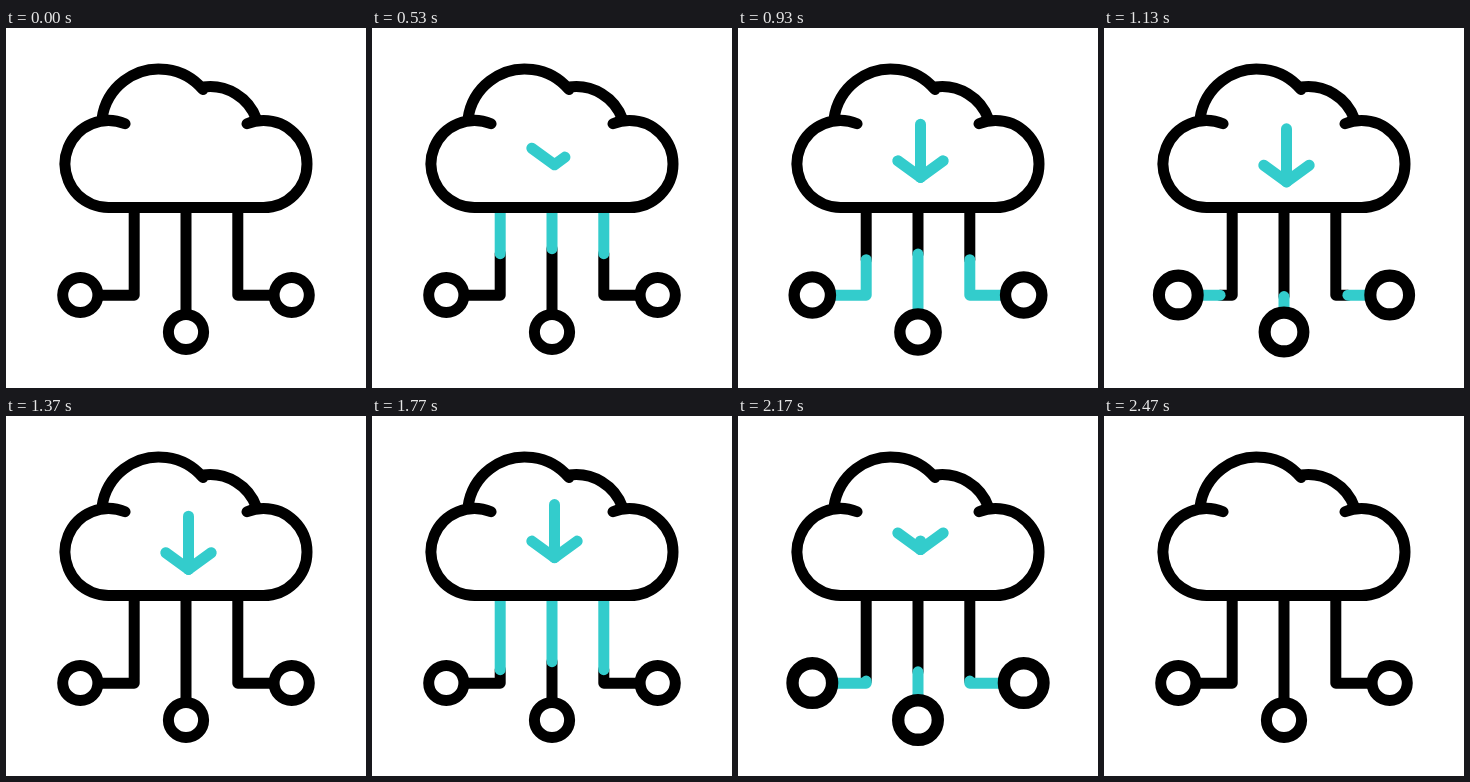
These frames come from a looping animation (360 px wide and 360 px high, 2500 ms). An HTML page with a canvas:

```html
<!DOCTYPE html>
<html lang="en">
<head>
<meta charset="utf-8">
<title>Cloud download</title>
<style>
  html, body { margin: 0; width: 100%; height: 100%; overflow: hidden; background: #fff; }
  canvas { display: block; }
</style>
</head>
<body>
<canvas id="stage" width="360" height="360"></canvas>
<script>
const ctx = document.getElementById('stage').getContext('2d');
const LOOP = 2500, START = 300, CYCLE = 1100;
const BLACK = '#000', TEAL = '#33cccc';

const wires = [
  [[128.2, 179.5], [128.2, 267.2], [92, 267.2]],
  [[180, 179.5], [180, 290]],
  [[231.8, 179.5], [231.8, 267.2], [268, 267.2]]
];
const nodes = [[74.3, 267], [180, 304], [285.7, 267]];
const chevron = [[159.8, 117], [182.5, 133.5], [205.2, 117]];
const stem = [[182.5, 133.5], [182.5, 80.5]];

const cloud = new Path2D();
cloud.arc(102.5, 136, 43.5, -1.18, Math.PI / 2, true);
cloud.arc(257.5, 136, 43.5, Math.PI / 2, -1.96, true);
cloud.moveTo(96, 91);
cloud.arc(153, 98.5, 57.5, Math.PI + 0.13, -0.7);
cloud.arc(204, 108, 49.5, -1.71, -0.34);

const ramp = (t, from, to) => Math.min(1, Math.max(0, (t - from) / (to - from)));
const smooth = x => x * x * (3 - 2 * x);

const length = pts => pts.slice(1).reduce(
  (sum, p, i) => sum + Math.hypot(p[0] - pts[i][0], p[1] - pts[i][1]), 0);

// Strokes the part of a polyline between two fractions of its length.
function trace(pts, color, from, to) {
  if (to - from < 0.001) return;
  const len = length(pts);
  ctx.strokeStyle = color;
  ctx.beginPath();
  pts.forEach(p => ctx.lineTo(...p));
  ctx.setLineDash([(to - from) * len + 0.01, 1000]);
  ctx.lineDashOffset = -from * len;
  ctx.stroke();
  ctx.setLineDash([]);
}

function drawArrow(t) {
  const a = length(chevron), b = length(stem);
  const shown = (a + b) * (ramp(t, 300, 915) - ramp(t, 1967, 2467));
  const dip = smooth(ramp(t, 300, 1233)) - smooth(ramp(t, 1233, 2167));
  ctx.save();
  ctx.translate(0, 21 * dip);
  trace(chevron, TEAL, 0, Math.min(1, shown / a));
  trace(stem, TEAL, 0, Math.max(0, (shown - a) / b));
  ctx.restore();
}

function drawNode([x, y], scale) {
  ctx.save();
  ctx.translate(x, y);
  ctx.scale(scale, scale);
  ctx.beginPath();
  ctx.arc(0, 0, 17.6, 0, 2 * Math.PI);
  ctx.fillStyle = '#fff';
  ctx.fill();
  ctx.strokeStyle = BLACK;
  ctx.stroke();
  ctx.restore();
}

function draw(t) {
  const phase = t < START ? 0 : (t - START) % CYCLE;
  const head = ramp(phase, 0, 620), tail = ramp(phase, 412, 932);
  const pulse = (1 - Math.cos(2 * Math.PI * ramp(phase, 560, 980))) / 2;

  ctx.clearRect(0, 0, 360, 360);
  ctx.lineCap = ctx.lineJoin = 'round';
  ctx.lineWidth = 11;
  for (const wire of wires) {
    trace(wire, BLACK, 0, tail);
    trace(wire, BLACK, head, 1);
    trace(wire, TEAL, tail, head);
  }
  ctx.strokeStyle = BLACK;
  ctx.stroke(cloud);
  nodes.forEach(node => drawNode(node, 1 + 0.125 * pulse));
  drawArrow(t);
}

const begin = performance.now();
function tick() {
  draw((performance.now() - begin) % LOOP);
  requestAnimationFrame(tick);
}
tick();
</script>
</body>
</html>
```
